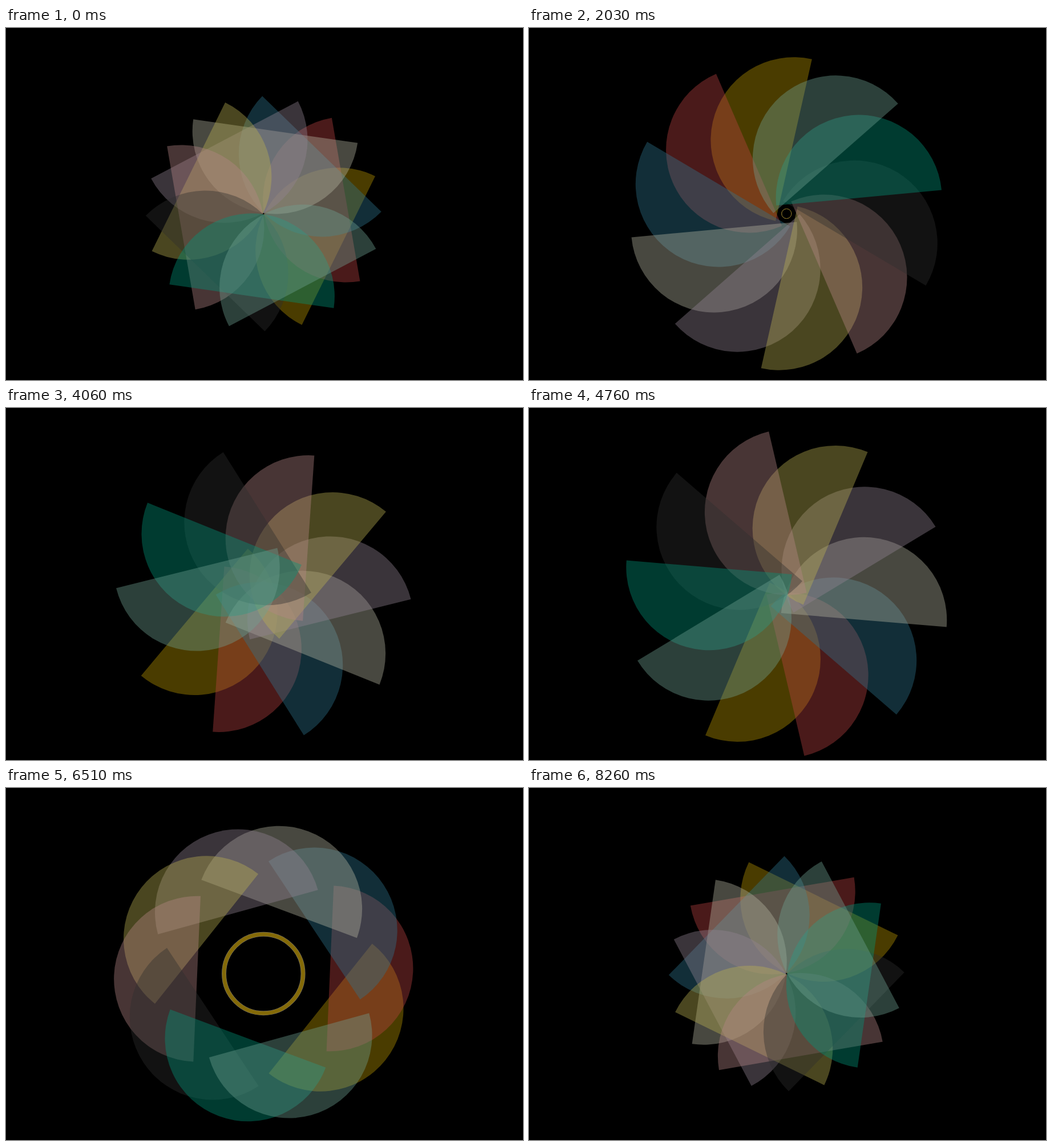
An HTML page that plays this animation: 906 px wide and 618 px high, repeating every 8.33 s.

```html
<!DOCTYPE html>
<html lang="en">
<head>
<meta charset="utf-8">
<title>Turning petals</title>
<style>
  html, body { margin: 0; width: 100%; height: 100%; overflow: hidden; background: #000; }
  svg { display: block; width: 906px; height: 618px; }
</style>
</head>
<body>
<svg viewBox="0 0 906 618">
  <g transform="translate(451.3 326)">
    <g id="ring" fill="none">
      <circle r="69.8" stroke="#77705a" stroke-width="8"/>
      <circle r="69.8" stroke="#846a08" stroke-width="6.4"/>
    </g>
    <g id="petals" fill-opacity="0.4"></g>
  </g>
</svg>
<script>
const STEP = 70, STEPS = 119, RADIUS = 145.5;

// Bottom to top; each next petal sits 36 degrees further counter-clockwise.
const COLORS = ["#b99600", "#b94343", "#2d738c", "#b4b4a0", "#918291",
                "#b9af50", "#b48484", "#2d2d2d", "#009478", "#6ea091"];

// Turn of each petal: [step, degrees]
const TURNS = [[0, 180], [17, 2], [42, -145], [58, -125], [66, -97],
               [78, -178], [93, -353], [118, -540]];

const radians = degrees => degrees * Math.PI / 180;
const ring = document.getElementById("ring");
const petals = COLORS.map(color => {
  const path = document.createElementNS("http://www.w3.org/2000/svg", "path");
  path.setAttribute("d", `M0 ${-RADIUS}A${RADIUS} ${RADIUS} 0 0 1 0 ${RADIUS}Z`);
  path.setAttribute("fill", color);
  return document.getElementById("petals").appendChild(path);
});

function slope(i) {
  const [n0, a0] = TURNS[Math.max(i - 1, 0)];
  const [n1, a1] = TURNS[Math.min(i + 1, TURNS.length - 1)];
  return (a1 - a0) / (n1 - n0);
}

// Cubic Hermite curve through the key turns
function turnAt(n) {
  const i = Math.max(0, TURNS.findIndex(key => key[0] >= n) - 1);
  const [n0, a0] = TURNS[i], [n1, a1] = TURNS[i + 1];
  const span = n1 - n0, s = (n - n0) / span, r = 1 - s;
  return a0 * (1 + 2 * s) * r * r + a1 * (3 - 2 * s) * s * s
    + span * s * r * (slope(i) * r - slope(i + 1) * s);
}

// Petals facing inward sit further out; mid-loop they also swing in and out twice.
function distanceAt(n, turn) {
  const swing = n > 42 && n < 78 ? 23 * Math.sin(radians(20 * (n - 42))) : 0;
  return 131.7 - 14.8 * Math.cos(radians(turn)) + swing;
}

function draw(time) {
  const n = Math.floor(time / STEP) % STEPS;
  const orbit = -9.8 - 3.814 * n;
  const turn = turnAt(n), distance = distanceAt(n, turn);
  petals.forEach((petal, i) => petal.setAttribute("transform",
    `rotate(${orbit + 36 * (1 - i)}) translate(${distance}) rotate(${turn})`));
  ring.setAttribute("transform", `scale(${Math.max(0, Math.cos(radians(turn)))})`);
}

const start = performance.now();
function tick() {
  draw(performance.now() - start);
  requestAnimationFrame(tick);
}
tick();
</script>
</body>
</html>
```
